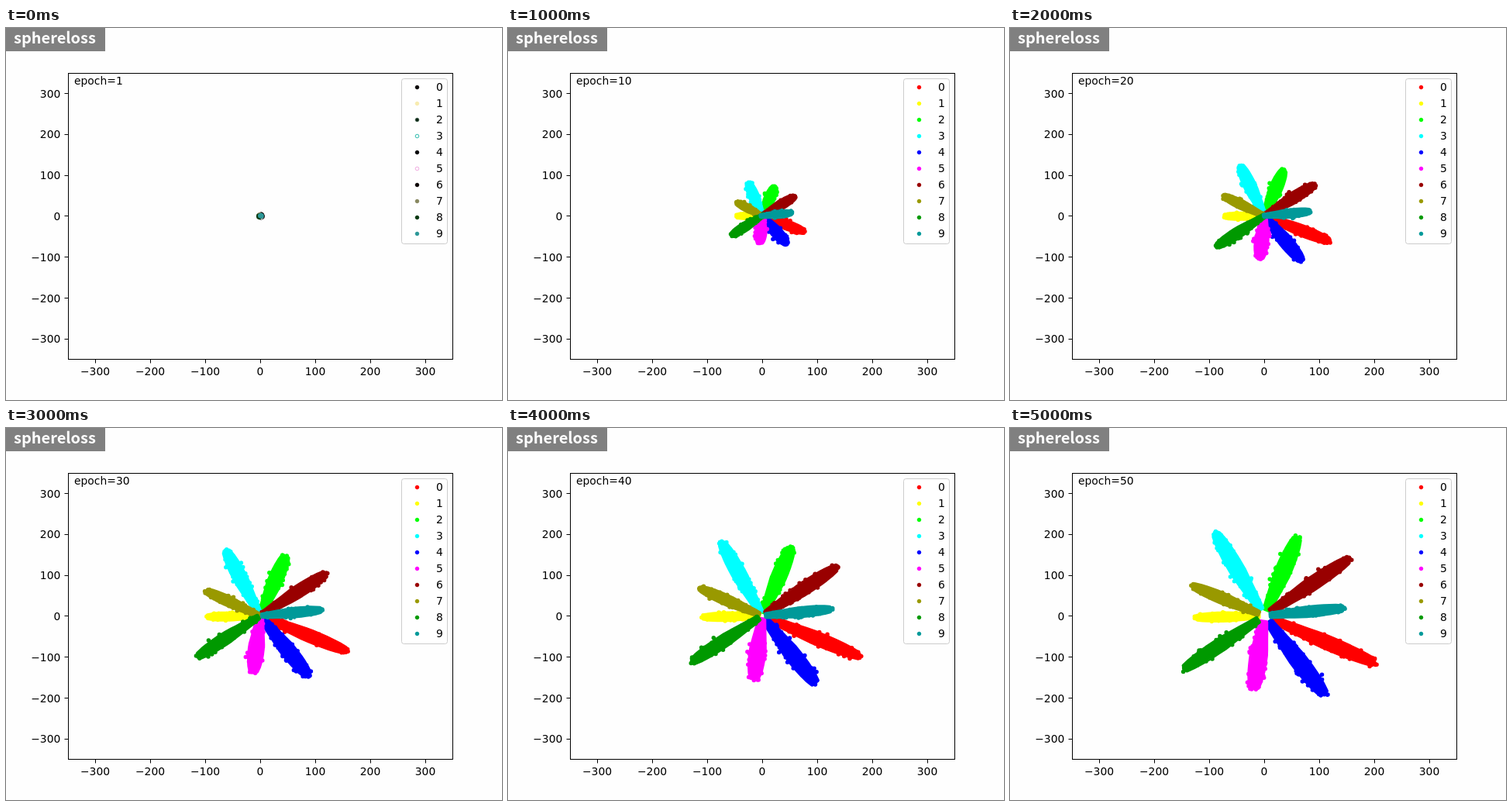
An HTML page that plays this animation: 640 by 480 pixels, repeating every 6000 ms.

```html
<!DOCTYPE html>
<html lang="en">
<head>
<meta charset="utf-8">
<title>sphereloss</title>
<style>
html, body { margin: 0; width: 100%; height: 100%; overflow: hidden; background: #fefefe; }
svg { display: block; width: 640px; height: 480px; }
text { font: 13.89px "DejaVu Sans", sans-serif; }
.title { font: bold 20px "Noto Sans CJK JP", "Noto Sans CJK SC", "Noto Sans CJK", sans-serif; fill: #fff; }
.rays path { stroke-width: 5.5; stroke-linecap: round; stroke-linejoin: round; }
.axes { fill: none; stroke: #000; }
</style>
</head>
<body>
<svg viewBox="0 0 640 480">
  <rect width="640" height="480" fill="#fefefe"/>
  <g class="rays" id="rays"></g>
  <g id="axes"></g>
  <text id="epoch" x="88" y="73"></text>
  <rect x="510.5" y="65.5" width="59" height="213" rx="3" fill="#fff" stroke="#ccc"/>
  <g id="legend"></g>
  <rect width="128" height="30" fill="#808080"/>
  <text class="title" x="10" y="20">sphereloss</text>
</svg>
<script>
const STEP = 1000, EPOCHS = [1, 10, 20, 30, 40, 50];
const GROWTH = [.02, .37, .58, .77, .87, 1];
const CX = 328, CY = 242.4;

// angle and turn in degrees, size in pixels at full growth;
// fill and edge are the legend colours at the first epoch
const CLASSES = [
  { color: '#ff0000', angle: -23, turn: 4, length: 159, width: 8.5, fill: '#0c0808' },
  { color: '#ffff00', angle: 181.5, turn: -2, length: 90, width: 5.2, fill: '#f8ecb0' },
  { color: '#00ff00', angle: 67, turn: 0, length: 112, width: 10, fill: '#0c2414', edge: '#3c5c48' },
  { color: '#00ffff', angle: 120.5, turn: -12, length: 126, width: 9.5, fill: '#fff', edge: '#20b8a8' },
  { color: '#0000ff', angle: -52.5, turn: 6, length: 131, width: 10.5, fill: '#050508' },
  { color: '#ff00ff', angle: -98, turn: 5, length: 97, width: 11, fill: '#fff', edge: '#f0a8e0' },
  { color: '#990000', angle: 33.8, turn: -5, length: 134, width: 8.5, fill: '#0c0404' },
  { color: '#999900', angle: 157.2, turn: -8, length: 102, width: 6.6, fill: '#888860' },
  { color: '#009900', angle: 213.5, turn: -2, length: 127, width: 8.2, fill: '#043810' },
  { color: '#009999', angle: 5.5, turn: 0, length: 105, width: 6.2, fill: '#2c9898' }
];

const $ = id => document.getElementById(id);
function set(el, attrs) {
  for (const k in attrs) el.setAttribute(k, attrs[k]);
  return el;
}
function add(parent, tag, attrs, text = '') {
  const el = set(document.createElementNS('http://www.w3.org/2000/svg', tag), attrs);
  el.textContent = text;
  return parent.appendChild(el);
}

function random(seed) {
  let s = seed * 7919 + 17;
  return () => (s = (s * 16807) % 2147483647) / 2147483647;
}

// Relative half width along a ray: widens, then rounds off
function profile(t) {
  const end = Math.max(0, (t - .6) / .42);
  return Math.min(1, .28 + 1.4 * Math.max(0, t)) * Math.sqrt(1 - end * end);
}

// A solid core with a loose cloud of dots around it
function ray({ angle, turn, length, width }, growth, seed) {
  const a = -(angle + turn * (1 - growth)) * Math.PI / 180;
  const ux = Math.cos(a), uy = Math.sin(a);
  const len = length * growth, half = width * Math.sqrt(growth);
  const start = .2 * growth - .12;
  const at = (t, side) => {
    const r = t * len, off = side * half * profile(t);
    return (CX + ux * r - uy * off).toFixed(1) + ',' + (CY + uy * r + ux * off).toFixed(1);
  };
  const near = [], far = [];
  for (let i = 0; i <= 12; i++) {
    const t = start + (.96 - start) * i / 12;
    near.push(at(t, .85));
    far.unshift(at(t, -.85));
  }
  let d = 'M' + near.concat(far).join('L') + 'Z';
  const rnd = random(seed);
  for (let i = 0; i < 180; i++) {
    const t = start + (1 - start) * rnd();
    const side = (rnd() + rnd() + rnd() - 1.5) * 1.05;
    d += `M${at(t, side)}h0`;
  }
  return d;
}

function buildAxes() {
  const g = $('axes');
  let ticks = '';
  for (let v = -300; v <= 300; v += 100) {
    const x = CX + v * .70857, y = CY - v * .528;
    const label = String(v).replace('-', '\u2212');
    ticks += `M${Math.round(x) + .5},428v4.5M80,${Math.round(y) + .5}h-4.5`;
    add(g, 'text', { x: Math.round(x), y: 448, 'text-anchor': 'middle' }, label);
    add(g, 'text', { x: 70.3, y: Math.round(y + 5.6), 'text-anchor': 'end' }, label);
  }
  add(g, 'path', { class: 'axes', d: ticks });
  add(g, 'rect', { class: 'axes', x: 80.5, y: 58.5, width: 496, height: 369 });
}

buildAxes();
const items = CLASSES.map((c, k) => {
  const y = 76 + 21 * k;
  add($('legend'), 'text', { x: 555, y: y + 5 }, k);
  return {
    ...c,
    shapes: GROWTH.map((g, n) => ray(c, g, k * 11 + n + 1)),
    path: add($('rays'), 'path'),
    mark: add($('legend'), 'circle', { cx: 530.5, cy: y + .5, r: 2.25 })
  };
});

let shown = -1;
function draw(ms) {
  const n = Math.floor(ms / STEP) % EPOCHS.length;
  if (n === shown) return;
  shown = n;
  $('epoch').textContent = 'epoch=' + EPOCHS[n];
  for (const { color, fill, edge = fill, shapes, path, mark } of items) {
    set(path, { d: shapes[n], fill: n ? color : fill, stroke: n ? color : fill });
    set(mark, { fill: n ? color : fill, stroke: n ? color : edge });
  }
}

const t0 = performance.now();
function tick() {
  draw(performance.now() - t0);
  requestAnimationFrame(tick);
}
tick();
</script>
</body>
</html>
```
